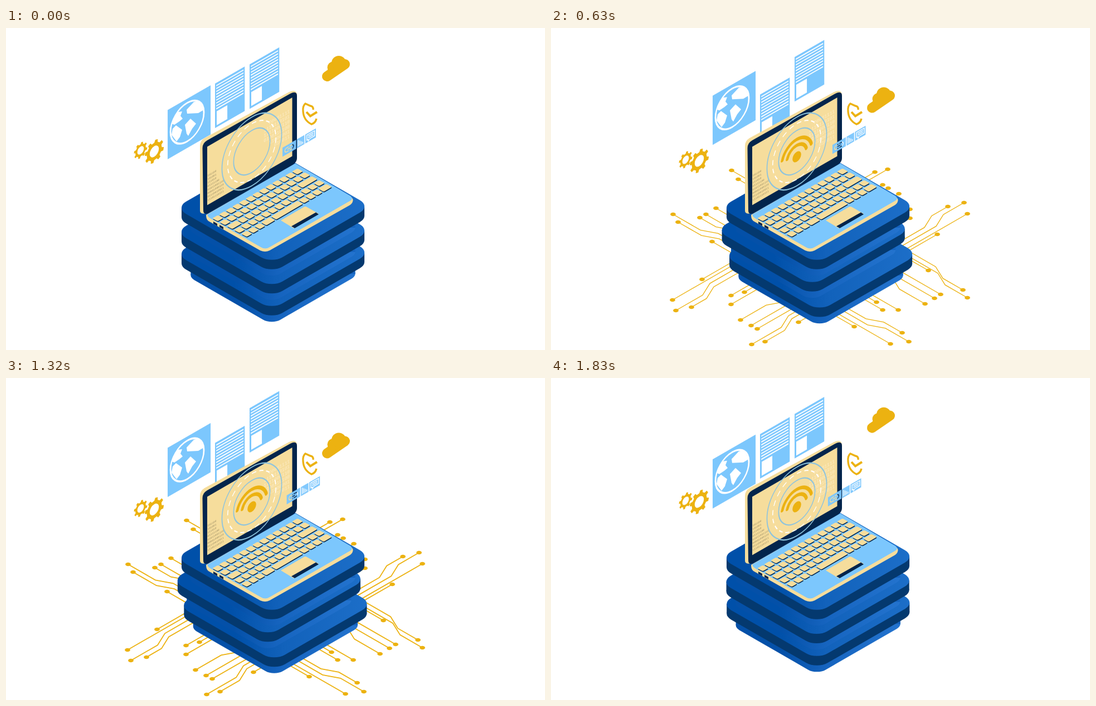
An HTML page for the animation above (1.86 s loop, 967 px wide and 579 px high).

```html
<!DOCTYPE html>
<html lang="en">
<head>
<meta charset="utf-8">
<title>Laptop on server stack</title>
<style>
html, body { margin: 0; width: 100%; height: 100%; overflow: hidden; background: #fff; }
svg { display: block; width: 967px; height: 579px; }
text { font-family: "Liberation Mono", "DejaVu Sans Mono", monospace; white-space: pre; }
</style>
</head>
<body>
<svg id="stage" viewBox="0 0 967 579" xmlns="http://www.w3.org/2000/svg"></svg>
<script>
const GOLD = '#ecb211', SKY = '#7cc7fd', SAND = '#f6dd9c', NAVY = '#03254c', SIDE = '#04396f', RING = '#8fc4dd';
const LOOP = 1860, HALF = LOOP / 2, STEP = 30;
const COS = Math.cos(Math.PI / 6), SLOPE = Math.tan(Math.PI / 6);

const $ = id => document.getElementById(id);
const range = n => [...Array(n).keys()];
const repeat = (n, make) => range(n).map(make).join('');
const rect = (x, y, w, h, fill, rx = 0) =>
  `<rect x="${x}" y="${y}" width="${w}" height="${h}" rx="${rx}" fill="${fill}"/>`;
const disc = (x, y, r, fill) => `<circle cx="${x}" cy="${y}" r="${r}" fill="${fill}"/>`;
const path = (d, fill) => `<path d="${d}" fill="${fill}"/>`;
const line = (d, color, width, extra = '') =>
  `<path d="${d}" fill="none" stroke="${color}" stroke-width="${width}" ${extra}/>`;
const ring = (r, color, width, extra = '') =>
  `<circle r="${r}" fill="none" stroke="${color}" stroke-width="${width}" ${extra}/>`;
const group = (id, body) => `<g id="${id}">${body}</g>`;

// Isometric planes: an upright wall and the floor.
const wall = (x, y, body) => `<g transform="matrix(${COS} -.5 0 1 ${x} ${y})">${body}</g>`;
const floorRect = (cx, cy, size, r, fill) => {
  const w = size - 2.5, h = size + 2.5;
  return `<g transform="matrix(${COS} .5 ${-COS} .5 ${cx} ${cy})">${rect(-w / 2, -h / 2, w, h, fill, r)}</g>`;
};

function block(cy, size, r, depth, side, top) {
  const cx = 479, half = COS * (size - .586 * r);
  return floorRect(cx, cy + depth, size, r, side)
    + rect(cx - half, cy + 1, half, depth, side) + rect(cx, cy - 1, half, depth, side)
    + floorRect(cx, cy, size, r, top);
}
const slab = cy => block(cy + 20, 181, 18, 18, 'url(#plinth)', 'url(#plinth)')
  + block(cy, 202.3, 22, 17, SIDE, 'url(#top)');

// A trace runs from its pad along a floor axis until the stack hides it;
// an optional jog (steep or flat) comes after a given run.
const hidden = (x, y) => {
  const d = Math.abs(x - 479);
  return d < 145 && y < 515 - SLOPE * d && y > 235 + SLOPE * d;
};
function trace(pad, sx, sy) {
  const [px, py, run, flat] = pad.split(/[ ,]/);
  let x = +px, y = +py, d = `M${x} ${y}`;
  const go = (dx, dy) => { x += sx * dx; y += sy * dy; d += `L${x.toFixed(1)} ${y.toFixed(1)}`; };
  if (run) {
    go(+run, run * SLOPE);
    flat ? go(32, 6) : go(13, 21);
  }
  let rest = 0;
  while (!hidden(x + sx * rest, y + sy * rest * SLOPE) && rest < 150) rest++;
  go(rest, rest * SLOPE);
  return line(d, GOLD, 'inherit')
    + `<ellipse cx="${px}" cy="${py}" rx="4.9" ry="3.3" fill="${GOLD}"/>`;
}
const fan = (sx, sy, pads) => pads.split(';').map(p => trace(p, sx, sy)).join('');
const circuit =
  fan(1, 1, '324,256;336,272;296,324;278,335;289,384;267,341 29 flat;219,335 49 flat;228,349 42 flat')
  + fan(1, -1, '271,452;218,489;323,481;347,475;323,497;359,535;370,541;444,529;'
    + '224,508 48;252,502 27;360,569 53;384,564 35;340,525 46 flat')
  + fan(-1, -1, '544,537;609,568;584,493;595,507;623,507;688,486;699,479;677,436;'
    + '671,496 46;747,485 40;739,471 36;642,564 42 flat;630,548 33 flat')
  + fan(-1, 1, '693,371;747,334;581,259;604,254;595,282;605,288;624,298;644,326;644,342;741,314 37;712,321 29');

function gear(x, y, R, hole) {
  const teeth = 8, pts = range(teeth * 4).map(i => {
    const a = (Math.floor(i / 4) + .3 + [-.29, -.17, .17, .29][i % 4]) * 2 * Math.PI / teeth;
    const r = i % 4 % 3 ? R : R * .78;
    return `${(r * Math.cos(a)).toFixed(2)} ${(r * Math.sin(a)).toFixed(2)}`;
  });
  return wall(x, y, `<path d="M${pts.join('L')}Z M${hole} 0A${hole} ${hole} 0 1 0 ${-hole} 0A${hole} ${hole} 0 1 0 ${hole} 0Z"
    fill="${GOLD}" fill-rule="evenodd"/>`);
}

const globe = wall(290, 147.5, rect(0, 0, 89, 88.5, SKY)
    + `<g transform="translate(40.5 42)">${ring(34.6, '#fff', 3.2)}</g>`)
  + path('M297 172L301 161 308 151 316 150 313 158 317 163 311 168 302 174Z'
    + 'M299 181L305 175 316 183 312 196 306 204 297 192Z'
    + 'M324 147L337 133 346 131 355 147 345 153 325 154Z'
    + 'M321 174L331 163 341 172 334 181 327 194 324 190Z', '#fff');

const doc = (x, y) => wall(x, y, rect(0, 0, 61.5, 80, SKY)
  + repeat(9, i => rect(2.5, 4 + i * 5.2, 56.5, 2.1, '#fff'))
  + rect(3.5, 51.5, 22, 25, '#fff'));

const cloud = line('M576 87L608 65', GOLD, 18, 'stroke-linecap="round"')
  + disc(587, 71, 10.5, GOLD) + disc(597, 63, 13, GOLD);

const shield = line('M551 147Q552 141 546 140L537 136Q532 140 533 150Q534 166 548 173Q555 171 557 163', GOLD, 3.4)
  + line('M539 151L546 158.500L558 151', GOLD, 4);

// Tiles with see-through glyphs.
const chips = wall(496, 215, `<mask id="glyphs" maskUnits="userSpaceOnUse" x="0" y="-2" width="72" height="22">
    ${rect(0, 0, 70, 17, '#fff')}
    <g fill="none" stroke="#000" stroke-width="1.5">
      <path d="M13 5H8.500a3.500 3.500 0 0 0 0 7H13M15 5h4.500a3.500 3.500 0 0 1 0 7H15M10.500 8.500h7"/>
      ${repeat(4, i => `<path d="M${33 + i * 3} ${3 + i * 2.5}V14"/>`)}
      <path d="M50.500 3H66.500V12H57L53.500 15V12H50.500ZM53 6H64M53 9H64"/>
    </g></mask>
  <g mask="url(#glyphs)" opacity=".95">${rect(0, 0, 28.3, 16.5, SKY) + rect(30, 0, 15.5, 16.5, SKY) + rect(47.3, 0, 22, 16.5, SKY)}</g>`);

// Keyboard: each row fills 13 units; wide keys are named, the rest share the space.
const keyRow = (n, wide = {}) => {
  const used = Object.values(wide).reduce((a, b) => a + b, 0);
  const each = (13 - used) / (n - Object.keys(wide).length);
  return range(n).map(i => wide[i] || each);
};
const rows = [keyRow(13), keyRow(13), keyRow(11, { 0: 1.6, 10: 2.4 }), keyRow(13), keyRow(9, { 3: 1.5, 4: 4.2, 8: 1.4 })];
function keys(dx, dy, fill) {
  const caps = rows.map((row, j) => {
    let u = 0;
    return row.map(w => rect((u += w) - w + .08, j + .12, w - .16, .76, fill, .14)).join('');
  }).join('');
  return `<g transform="matrix(11.9 -7 13 7 ${367.5 + dx} ${342 + dy})">${caps}</g>`;
}

const deck = path('M359 336L519 244L618 303Q624 307 622 312Q621 316 616 319L473 400Q465 404 456 400L363 347Q359 344 359 336Z', SAND)
  + path('M362 335L519 243.500L618 302Q624 307 617 311L473 394Q465 399 457 394L366 342Q360 338 362 335Z', SKY)
  + path('M372 348l7 4v4l-7-4ZM383 354l7 4v4l-7-4Z', NAVY)
  + keys(.6, 1.5, NAVY) + keys(0, 0, SAND)
  + path('M493 346L535 321.500Q537 320.500 539 321.500L561 334L516 360Z', SAND)
  + path('M512 356.500L556 331.500L561 335L518 360Z', NAVY);

let seed = 7;
const bit = () => (seed = seed * 16807 % 2147483647) % 97 % 2;
const bits = (lengths, pitch, size, attrs) => lengths.map((n, i) =>
  `<text y="${i * pitch}" font-size="${size}" ${attrs}>${repeat(n, bit)}</text>`).join('');
const screenText =
  wall(361.5, 267.5, bits([6, 6, 6, 8, 11, 11, 11, 11], 6.3, 5.1, 'font-weight="700" fill="#b5a475"'))
  + wall(509, 152, bits([8, 10, 10, 10, 8, 6], 9, 9, 'text-anchor="end" fill="#fcecc8"'));

const rings = wall(441, 222, ring(61.8, RING, 2)
  + ring(50, '#fff', 1.8, 'stroke-dasharray="9 6.700"') + ring(37.7, RING, 2));

const wave = r => line(`M${-r * .966} ${-r * .26}A${r} ${r} 0 0 1 ${r * .966} ${-r * .26}`, GOLD, 6, 'stroke-linecap="round"');
const wifi = wall(441, 231.5,
  group('dot', disc(0, 0, 9, GOLD)) + group('waveIn', wave(20.5)) + group('waveOut', wave(31.2)));

const lid = path('M348 212Q348 203 356 198L508 115Q521 109 522 120V236L360 333Q348 336 348 328Z', SAND)
  + path('M352.500 216Q352.500 207 361 202L510 118Q522 112 522 122V234Q522 241 515 245.500L362 333.500Q354 336 354 328Z', NAVY)
  + path('M361 213.500L513.500 125V230.500L361 318.500Z', SAND)
  + screenText + rings + wifi;

const gradient = (id, from, mid, to) => `<linearGradient id="${id}" x1="0" y1="1" x2="1" y2="0">
  <stop offset=".3" stop-color="${from}"/><stop offset=".55" stop-color="${mid}"/><stop offset="1" stop-color="${to}"/></linearGradient>`;

$('stage').innerHTML = `<defs>${gradient('top', '#0050a9', '#1262bb', '#1d6fc9')}${gradient('plinth', '#0450a8', '#1664bf', '#2474cf')}</defs>`
  + group('circuit', circuit)
  + group('low', slab(405)) + group('mid', slab(365.5)) + slab(322)
  + group('globe', globe) + group('docA', doc(375, 100)) + group('docB', doc(437, 65.5))
  + group('cloud', cloud) + group('gears', gear(241.5, 220, 14, 6.8) + gear(266, 222, 20, 9.5))
  + deck + lid + shield + group('chips', chips);

// Travel from rest to the turning point at half the loop.
const travel = {
  low: [7.5, 4.3], mid: [-12.3, -5], globe: [0, -38], docA: [0, 29], docB: [0, -19.5],
  cloud: [0, 83.5], gears: [0, 25], chips: [12.4, -7]
};
const appear = { dot: 150, waveIn: 300, waveOut: 480 };
const triangle = (t, period) => 1 - Math.abs(1 - 2 * (t % period) / period);
const show = (id, on) => { $(id).style.display = on ? '' : 'none'; };

function draw(t) {
  const p = triangle(t, LOOP);
  for (const id in travel) {
    const [dx, dy] = travel[id];
    $(id).setAttribute('transform', `translate(${dx * p} ${dy * p})`);
  }
  // The circuit pulses twice per loop and shows only above half strength.
  const glow = triangle(t, HALF);
  show('circuit', glow > .5);
  $('circuit').setAttribute('stroke-width', Math.max(.9, 2.4 * glow - .2));
  for (const id in appear) show(id, t >= appear[id]);
}

const start = performance.now();
function tick() {
  const t = (performance.now() - start) % LOOP;
  draw(Math.floor(t / STEP) * STEP);
  requestAnimationFrame(tick);
}
tick();
</script>
</body>
</html>
```
